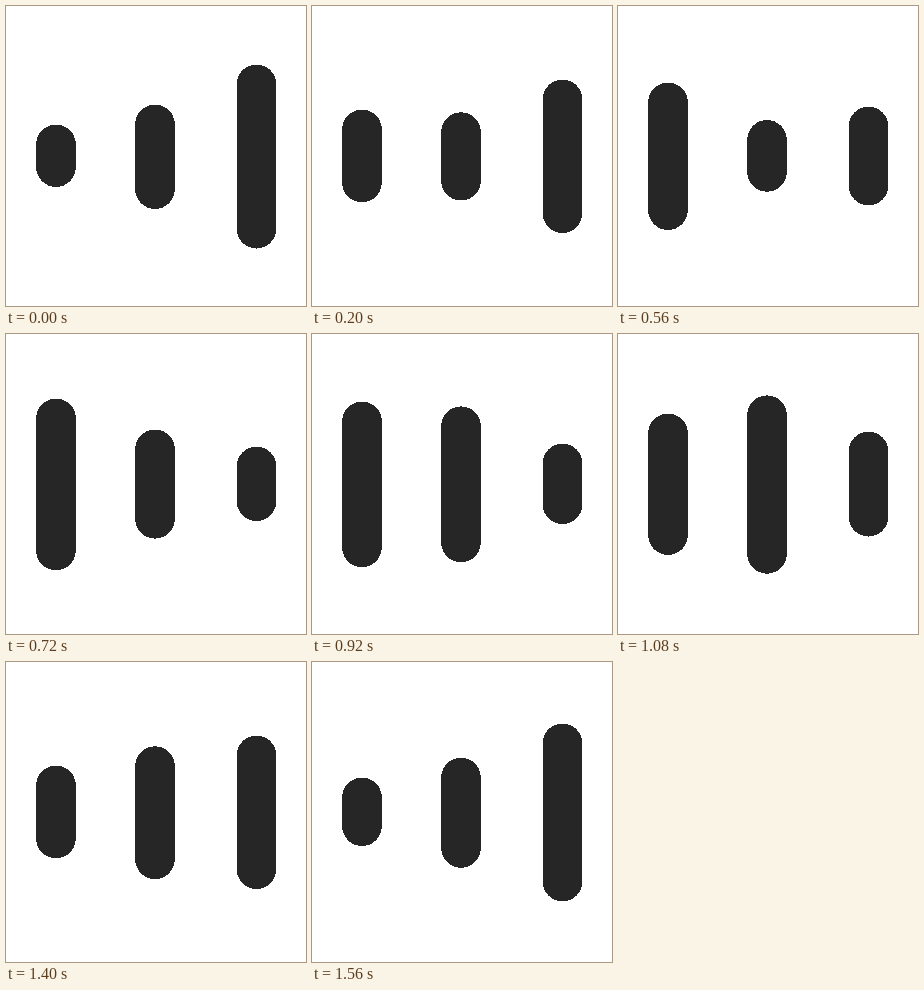
An HTML page that plays this animation: 300x300 px, repeating every 1.6 s.

```html
<!DOCTYPE html>
<html lang="en">
<head>
<meta charset="utf-8">
<title>Three bars</title>
<style>
  html, body { margin: 0; width: 100%; height: 100%; overflow: hidden; background: #fff; }
  svg { display: block; width: 300px; height: 300px; }
  rect { fill: #262626; width: 39.6px; rx: 19.8px; shape-rendering: crispEdges; }

  /* 25 positions per second, held for 40 ms each */
  .side { animation: side 1.6s steps(20, end) infinite; }
  .late { animation-delay: -0.8s; }
  .middle { animation: middle 1.6s steps(13, end) infinite; }

  @keyframes side {
    0%, 100% { y: 118.6px; height: 62.4px; }
    50% { y: 58.5px; height: 184px; }
  }
  @keyframes middle {
    0% { y: 98.6px; height: 104.4px; }
    32.5% { y: 118.6px; height: 62.4px; }
    65% { y: 58.5px; height: 184px; animation-timing-function: steps(14, end); }
    100% { y: 98.6px; height: 104.4px; }
  }
</style>
</head>
<body>
<svg viewBox="0 0 300 300">
  <rect class="side" x="30.2"/>
  <rect class="middle" x="129.2"/>
  <rect class="side late" x="230.7"/>
</svg>
</body>
</html>
```
